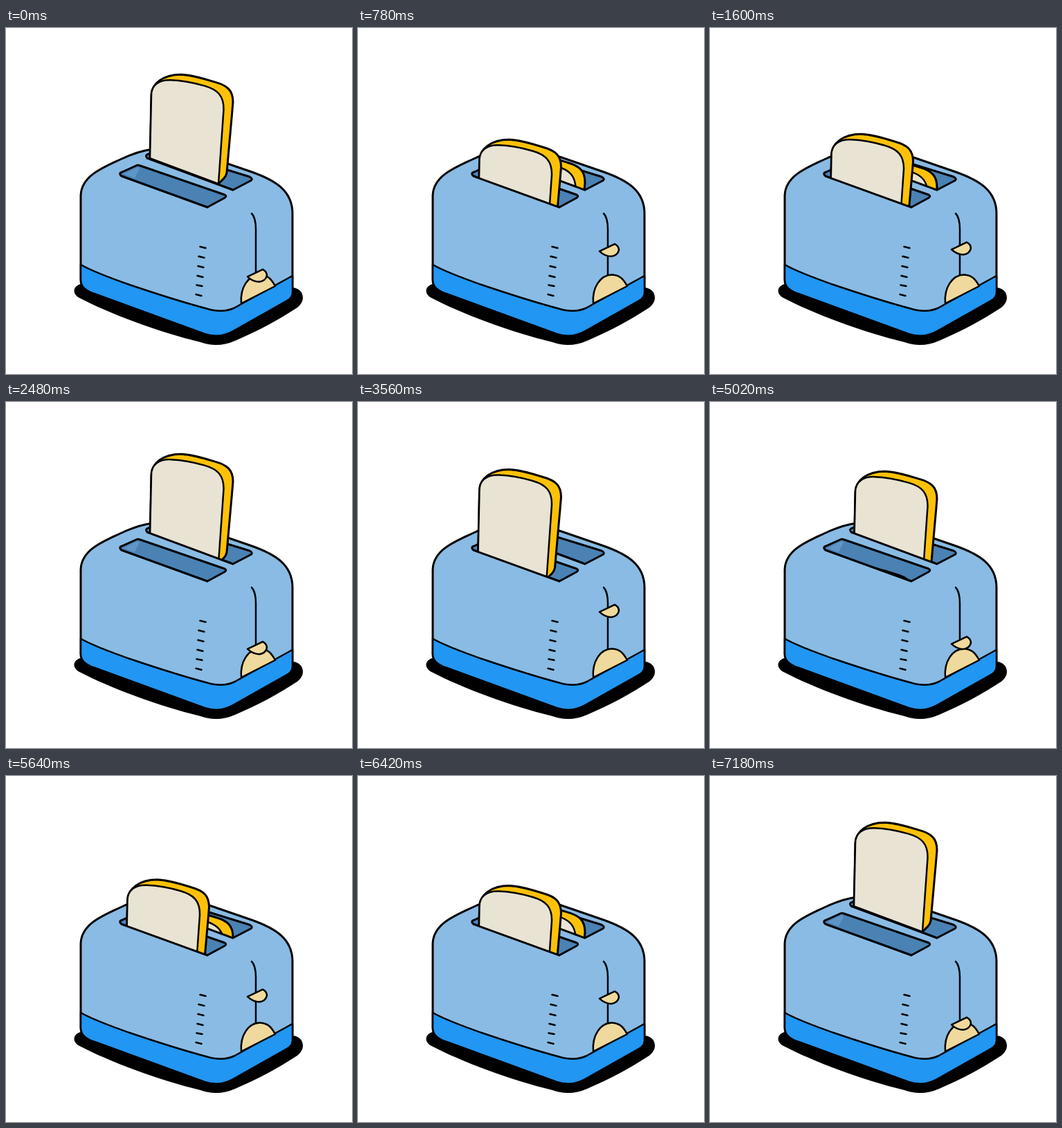
An HTML page that plays this animation: 500x500 px, repeating every 7200 ms.

```html
<!DOCTYPE html>
<html lang="en">
<head>
<meta charset="utf-8">
<title>Toaster</title>
<style>
  html, body { margin: 0; width: 100%; height: 100%; overflow: hidden; background: #fff; }
  svg { display: block; width: 100vw; height: 100vh; }
  .ink { stroke: #000; stroke-width: 2.5; stroke-linejoin: round; stroke-linecap: round; }
  .bold { stroke-width: 3; }
  .line { fill: none; }
  .body { fill: #89bbe4; }
  .base { fill: #2196f3; }
  .slot { fill: #4a82b4; }
  .wall { fill: #5e97c7; }
  .crust { fill: #ffc107; }
  .crumb { fill: #e8e3d3; }
  .knob { fill: #f0d99c; }
</style>
</head>
<body>
<svg viewBox="0 0 500 500">
  <defs>
    <clipPath id="backClip"><path d="M150 0V187H203L328 234L355 218V0Z"/></clipPath>
    <clipPath id="frontClip"><path d="M100 0V213H166L291 259L318 243V0Z"/></clipPath>
    <!-- One slice, its top edge at y = 0 -->
    <g id="slice">
      <path class="ink bold crust" d="M208 124L210 29C211 14 226 0 253 0C270 1 286 6 302 11C320 16 328 23 328 40L327 52L319 142Q318 147 315 150L307 158Z"/>
      <path class="ink crumb" d="M208 121L210 30C210 16 220 7.500 238 8C256 8.500 272 12 287 16.500C306 22 315 31 314.500 51L307 158Z"/>
    </g>
  </defs>

  <path d="M112 369C97 371 94 383 106 390C150 413 220 439 281 454Q306 463 331 452C364 438 395 421 421 404Q433 394 427 382Q423 376 414 375L300 340Z"/>
  <path class="ink bold body" d="M108 364V242C109 214 139 202 165 190C182 182 196 177 212 175C238 172 266 178 294 187L355 208C389 220 414 235 414 268V382Q414 390 406 394L328 438Q308 449 287 442L128 384C115 380 108 374 108 364Z"/>
  <path class="ink base" d="M108 342C122 350 150 361 180 371.500C220 385 258 397 290 405.500Q313 412.500 330 404.500L414 358V382Q414 390 406 394L328 438Q308 449 287 442L128 384C115 380 108 374 108 364Z"/>

  <path class="ink bold slot" d="M204 188Q200 184 206 182L219 176Q222 175 226 176L352 215Q358 218 353 221L328 234Z"/>
  <g clip-path="url(#backClip)"><use id="back" href="#slice"/></g>
  <path class="ink line" d="M204 188L328 234"/>

  <path id="slot" class="slot" d="M167 214Q162 210 168 208L189 198.500Q191 198 194 199L316 241Q320 243 315 246L291 259Z"/>
  <path class="wall" d="M167 211L190 199L194 201L185 220Z"/>
  <use href="#slot" class="ink bold"/>
  <path class="wall" d="M170 211L190 201.500L193 203L186 217Z"/>
  <g clip-path="url(#frontClip)"><use id="front" href="#slice"/></g>
  <path class="ink line" d="M167 214L291 259"/>

  <path class="ink line" d="M280.500 316l8 2M278.500 330l8 2M277.500 344l8 2M276.500 358l8 2M275.500 371.500l8 1.500M274.500 385l8 2"/>
  <path class="ink line" d="M355 268C360 273 361 281 361 291V357"/>
  <path class="ink knob" d="M340 398C338 375 350 357 367 356.500C379 357 384 364 389 373Z"/>
  <path id="lever" class="ink knob" d="M349 10.500L371 0Q377 3 377 9Q375 17 366 18Q357 18 349 10.500Z"/>
</svg>
<script>
  const LOOP = 7200, START = 20, PERIOD = 7180 / 3, HALF = PERIOD / 2, TURN = 15;
  const [back, front, lever] = ["back", "front", "lever"].map(id => document.getElementById(id));

  // Milliseconds to the nearest peak, from 0 to HALF
  const fromPeak = t => {
    const p = ((t - START) % PERIOD + PERIOD) % PERIOD;
    return Math.min(p, PERIOD - p);
  };
  // Fall below the peak, with a softly rounded turn
  const drop = d => {
    const s = Math.hypot(d, TURN) - TURN;
    return 0.179 * s - 2.85e-5 * s * s;
  };
  const place = (el, x, y) => el.setAttribute("transform", `translate(${x} ${y.toFixed(2)})`);

  function draw(t) {
    const d = fromPeak(t);
    place(back, 0, 65.5 + drop(d));
    place(front, -34.5, 91 + drop(HALF - d));
    place(lever, 0, 290.5 + 0.0495 * (HALF - d));
  }

  const begin = performance.now();
  function tick() {
    draw((performance.now() - begin) % LOOP);
    requestAnimationFrame(tick);
  }
  draw(0);
  requestAnimationFrame(tick);
</script>
</body>
</html>
```
